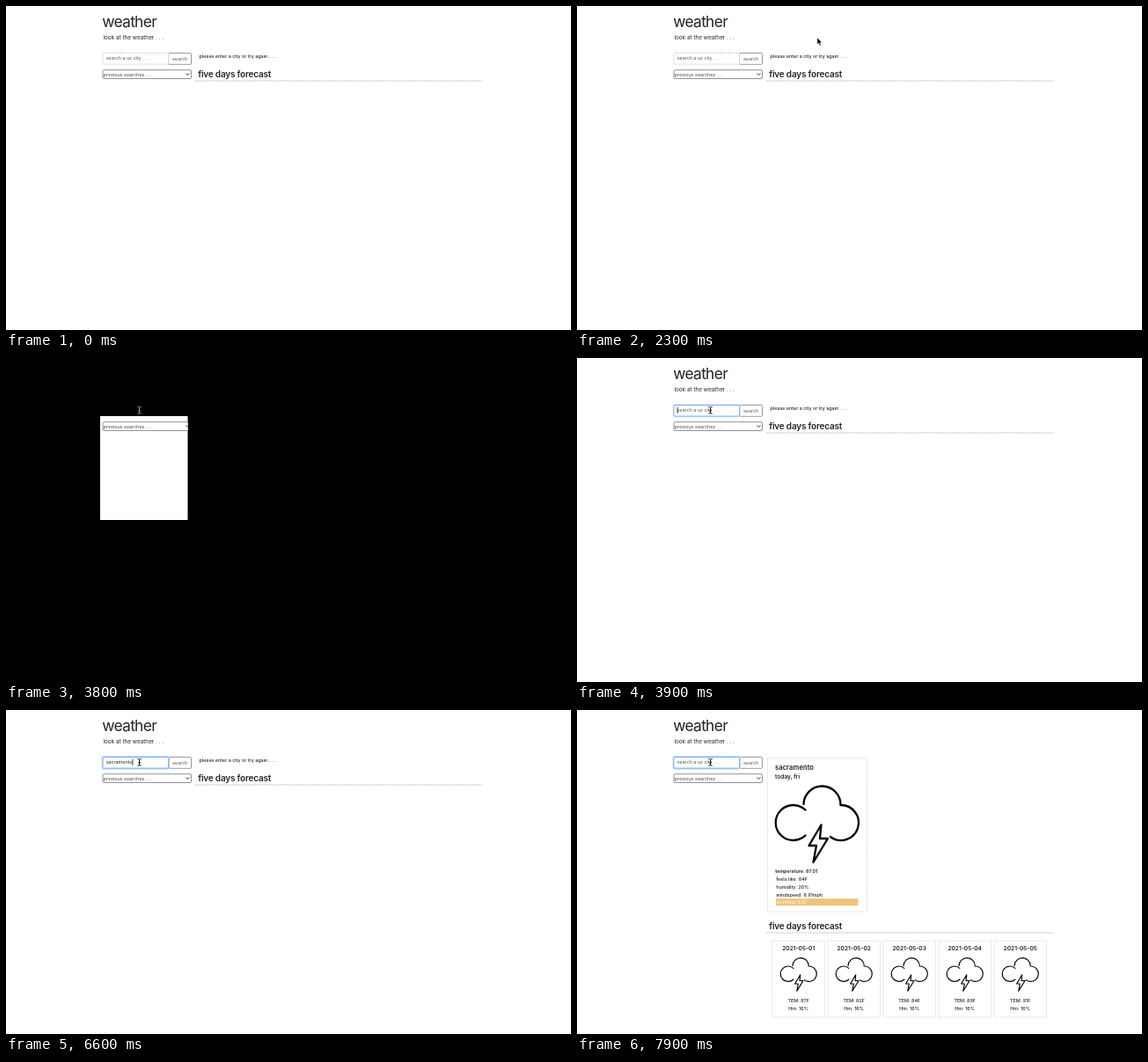
Animation of 642x368 px, one loop 8000 ms. Source, as an HTML page:

```html
<!DOCTYPE html>
<html lang="en">
<head>
<meta charset="utf-8">
<title>weather</title>
<style>
  html, body { margin: 0; width: 100%; height: 100%; overflow: hidden; background: #fff; }
  svg { display: block; width: 642px; height: 368px; }
  text { font-family: Inter, "Open Sans", sans-serif; font-size: 5.36px; fill: #212529; white-space: pre; }
  .gray { fill: #50565c; }
  .medium { font-weight: 500; }
  .semibold { font-weight: 600; }
  .center { text-anchor: middle; }
  .frame { fill: none; stroke: #dedede; stroke-dasharray: 2 1; }
</style>
</head>
<body>
<svg viewBox="0 0 642 368">
  <defs>
    <g id="storm" fill="none" stroke="#000" stroke-linejoin="round" stroke-linecap="round">
      <path d="M259.5 113.5A20 20 0 1 0 259.5 142.5"/>
      <path d="M257.5 107A21 21 0 0 1 299.5 108A20 20 0 1 1 288 144"/>
      <path d="M277.5 130.5L263.5 154H272L268.5 173L285 146H276Z"/>
    </g>
    <clipPath id="patch"><rect x="107" y="66" width="99.5" height="118"/></clipPath>
    <g id="select">
      <rect x="110" y="72.7" width="100.5" height="9.8" rx="1.5" fill="#fff" stroke="#777" stroke-width=".8"/>
      <text x="110.8" y="79.9" fill-opacity=".85">previous searches . . .</text>
      <path d="M204.6 76.5l2 2 2-2" fill="none" stroke="#333"/>
    </g>
  </defs>

  <g id="page">
    <text x="109.2" y="24" style="font-size:17.5px;font-weight:400;letter-spacing:-.75px">weather</text>
    <text x="110.4" y="37.5" style="font-size:6.4px">look at the weather . . .</text>

    <rect x="184.5" y="53.5" width="26" height="12.8" rx="1" fill="#fff" stroke="#7b8187" stroke-width=".8"/>
    <text class="gray center" x="197.5" y="61.9">search</text>
    <rect id="glow" x="109.3" y="52.7" width="76.2" height="14.2" rx="1.6" fill="none" stroke="#c5dcfb" stroke-width="1.5"/>
    <rect id="field" x="110" y="53.5" width="74.7" height="12.6" rx="1" fill="#fff"/>
    <text id="entry" x="113.7" y="61.4"></text>
    <rect id="caret" y="55.8" width=".8" height="7" fill="#111"/>
    <use href="#select"/>

    <text id="message" class="medium" x="219.5" y="59.2" style="font-size:5.36px">please enter a city or try again . . .</text>
    <g id="heading">
      <text class="semibold" x="218.2" y="80.5" style="font-size:10px;letter-spacing:-.2px">five days forecast</text>
      <path d="M215 85H541.5" stroke="#b8b8b8" stroke-width=".8" stroke-dasharray="2 .6"/>
    </g>

    <g id="results">
      <rect class="frame" x="216.5" y="54.5" width="113" height="174.5"/>
      <text class="semibold" x="225" y="67.7" style="font-size:7.7px">sacramento</text>
      <text class="semibold" x="225" y="78" style="font-size:6.6px">today, fri</text>
      <use href="#storm" stroke-width="2.3"/>
      <text class="semibold" x="225.2" y="184.8">temperature: 87.01</text>
      <g class="medium">
        <text x="226.2" y="193.9">feels like: 84F</text>
        <text x="226.2" y="202.9">humidity: 20%</text>
        <text x="226.2" y="211.7">windspeed: 6.91mph</text>
      </g>
      <rect x="226" y="214.2" width="93.5" height="8" fill="#edc47c"/>
      <text x="226.3" y="220.2" style="fill:#fff">uv index: 5.51</text>
      <g id="days"></g>
    </g>
  </g>

  <g id="flash">
    <rect width="642" height="368"/>
    <rect x="107" y="66" width="99.5" height="118" fill="#fff"/>
    <use href="#select" clip-path="url(#patch)"/>
  </g>
  <path id="ibeam" d="M149.4 55.4q2 0 2.2 1.2q.2-1.2 2.2-1.2M151.6 56.4V62.3M149.4 63.2q2 0 2.2-1.2q.2 1.2 2.2 1.2M150.4 59.8h2.4" fill="none" stroke-width=".9"/>
  <path id="arrow" d="M0 0V7.6L1.7 6L3 9L4.3 8.4L3 5.5H5.4Z" fill="#000" stroke="#fff" stroke-width=".4"/>
</svg>
<script>
const LOOP = 8000, STEP = 100;
const FLASH = 3800, FOCUS = 3900, SUBMIT = 6800, LOADED = 7300, FRAMED = 7700;
const CITY = "sacramento", HINT = "search a us city . . .";
const keyTimes = [4200, 4500, 4600, 4700, 4900, 5300, 5500, 5800, 6200, 6300];
const pointerPath = [[514, 151], [514, 102], [432, 52], [343, 28], [273, 36], [217, 46], [177, 54], [157, 57], [151, 58]];
const POINTER_START = 1900;

const $ = id => document.getElementById(id);
const show = (id, on) => $(id).setAttribute("display", on ? "inline" : "none");
const set = (id, attrs) => Object.entries(attrs).forEach(([k, v]) => $(id).setAttribute(k, v));

$("days").innerHTML = [87, 82, 84, 89, 91].map((temp, i) => `
  <g transform="translate(${i * 63} 0)">
    <rect class="frame day" x="222" y="262" width="59.5" height="87"/>
    <text class="semibold center" x="251.7" y="273" style="font-size:6.6px">2021-05-0${i + 1}</text>
    <use href="#storm" transform="translate(133 244) scale(.435)" stroke-width="2.7"/>
    <text class="medium center" x="251.7" y="331.8">TEM: ${temp}F</text>
    <text class="medium center" x="251.7" y="340.6">Hm: 16%</text>
  </g>`).join("");
const dayFrames = document.querySelectorAll(".day");

function drawEntry(t) {
  const typed = t < SUBMIT ? CITY.slice(0, keyTimes.filter(k => k <= t).length) : "";
  const entry = $("entry");
  entry.textContent = typed || HINT;
  entry.setAttribute("class", typed ? "" : "gray");
  const width = typed ? entry.getComputedTextLength() : 0;
  $("caret").setAttribute("x", 113.7 + width);
  show("caret", t >= FOCUS && t < LOADED);
}

function drawPointer(t) {
  const i = Math.min((t - POINTER_START) / STEP, pointerPath.length - 1);
  const visible = i >= 0 && t < FLASH;
  show("arrow", visible);
  if (visible) $("arrow").setAttribute("transform", `translate(${pointerPath[i]})`);
  show("ibeam", t >= FLASH);
  $("ibeam").setAttribute("stroke", t === FLASH ? "#aaa" : "#000");
}

function draw(time) {
  const t = Math.floor(time / STEP) * STEP;
  const focused = t >= FOCUS, loaded = t >= LOADED;
  show("page", t !== FLASH);
  show("flash", t === FLASH);
  show("glow", focused);
  set("glow", { opacity: t === FOCUS ? .4 : 1 });
  set("field", {
    stroke: focused ? "#78aaf0" : "#c3c8cc",
    "stroke-width": focused ? 1 : .8,
    "stroke-dasharray": focused ? "none" : "2 1"
  });
  show("message", t < SUBMIT);
  show("results", loaded);
  const shift = loaded ? 168 : t >= SUBMIT ? -8 : 0;
  set("heading", { transform: `translate(0 ${shift})` });
  dayFrames.forEach(f => f.setAttribute("opacity", t >= FRAMED ? 1 : 0));
  drawEntry(t);
  drawPointer(t);
}

const start = performance.now();
function tick() {
  draw((performance.now() - start) % LOOP);
  requestAnimationFrame(tick);
}
tick();
</script>
</body>
</html>
```
